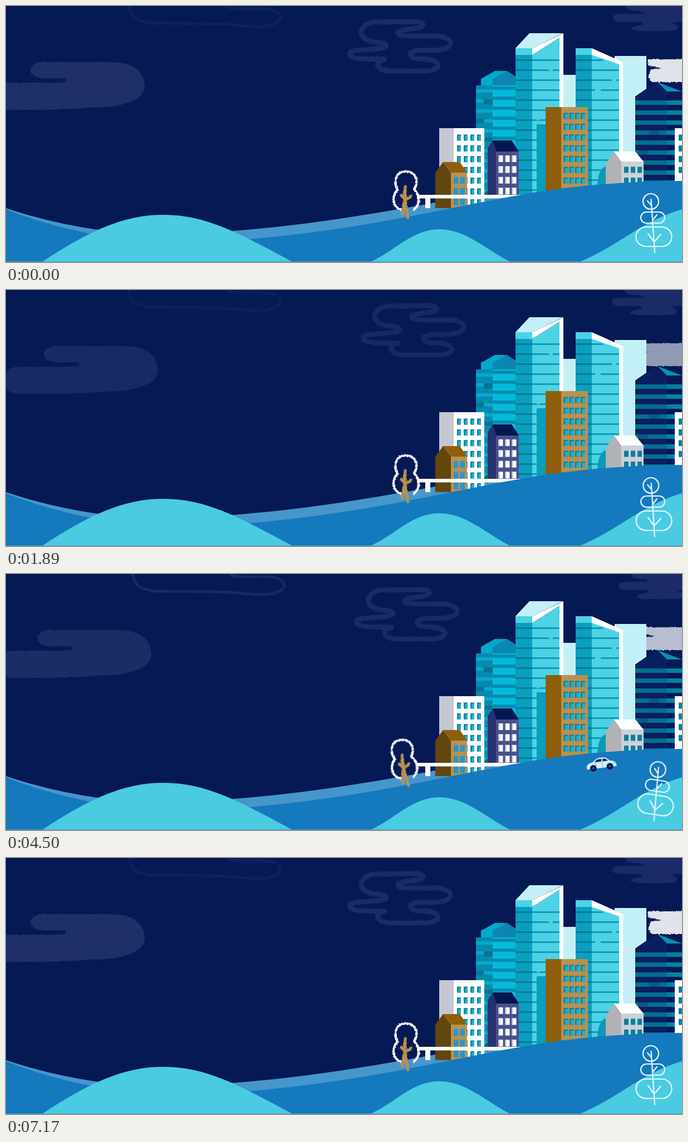
Write an HTML page without scripts that moves like this. It is 1214x461 px and loops after 7.2 s.

```html
<!DOCTYPE html>
<html lang="en">
<head>
<meta charset="utf-8">
<title>City hills</title>
<style>
html, body { margin: 0; width: 100%; height: 100%; overflow: hidden; background: #051955; }
svg { display: block; width: 100vw; height: 100vh; }
.line { fill: none; stroke-linecap: round; stroke-linejoin: round; }
.rough { filter: url(#rough); }

/* window rows: a dark pane with a lighter inset */
.dark { fill: none; stroke-width: 11; stroke: #0b7f9c; }
.glass { fill: none; stroke-width: 9; stroke: #1eb0ce; }

.drift, .sway { animation: 1.8s ease-in-out infinite alternate; }
.drift { animation-name: drift; }
.sway { animation-name: sway; animation-delay: -.9s; }
.lean { animation: lean .9s ease-in-out infinite alternate; }
.car { animation: drive 7.2s linear infinite; }

@keyframes drift {
  from { transform: none; opacity: var(--a, 1); }
  to { transform: translateX(var(--dx)); opacity: var(--b, .75); }
}
@keyframes sway {
  from { transform: translateX(calc(-1 * var(--dx))); opacity: var(--a); }
  to { transform: translateX(var(--dx)); opacity: var(--b); }
}
@keyframes lean { to { transform: rotate(var(--r)); } }
@keyframes drive {
  0% { transform: translate(-84px, 377px) rotate(16deg); }
  4.58% { transform: translate(-44px, 390px) rotate(15deg); }
  9.17% { transform: translate(2px, 402px) rotate(13deg); }
  18.33% { transform: translate(117px, 424px) rotate(9deg); }
  37.92% { transform: translate(457px, 438.5px) rotate(2deg); }
  45% { transform: translate(611px, 425px) rotate(-6deg); }
  52.08% { transform: translate(784px, 391px) rotate(-11deg); }
  59.72% { transform: translate(987px, 354px) rotate(-9deg); }
  68.75%, 100% { transform: translate(1254px, 335px) rotate(-3deg); }
}
</style>
</head>
<body>
<svg viewBox="0 0 1214 461" preserveAspectRatio="none">
  <defs>
    <filter id="rough" x="-10%" y="-10%" width="120%" height="120%" color-interpolation-filters="sRGB">
      <feTurbulence type="fractalNoise" baseFrequency=".4" numOctaves="2" seed="4"/>
      <feDisplacementMap in="SourceGraphic" scale="4" xChannelSelector="R" yChannelSelector="G"/>
    </filter>
    <path id="row4" d="M810,0h44"/>
    <path id="white" d="M810,237h44m-44,19.400h44m-44,19.400h44m-44,19.400h44m-44,19.400h44m-44,19.400h44m-44,19.400h44"/>
    <path id="brown" d="M1001.500,198h39m-39,19.400h39m-39,19.400h39m-39,19.400h39m-39,19.400h39m-39,19.400h39m-39,19.400h39"/>
    <path id="navy" d="M884.500,275h32m-32,19.400h32m-32,19.400h32m-32,19.400h32"/>
    <path id="gray" d="M1110,295h32m-32,19.400h32"/>
    <path id="cabin" d="M804,314h20m-20,19.400h20m-20,19.400h20"/>
  </defs>
  <rect width="1214" height="461" fill="#051955"/>

  <!-- clouds -->
  <g class="drift" style="--dx:24px">
    <path class="rough" fill="#1f3168" d="M-2,138H92C112,138 112,129 96,130H64C36,128 38,101 66,101H190C228,101 249,118 249,145C249,172 200,184 150,183C100,188 40,187 -2,187C-36,187 -36,138 -2,138Z"/>
  </g>
  <g class="drift" style="--dx:24.5px;--b:.85">
    <path class="line rough" stroke="#1a2d66" stroke-width="9" d="M660,29L738,28C756,30 750,40 730,41C700,43 695,52 718,54H775C808,58 805,78 770,80H740C718,83 722,94 745,95C782,95 785,113 758,117H690C664,116 660,100 680,96L640,95C609,94 609,80 640,79L668,77C692,74 684,66 664,65C632,62 628,36 660,29Z"/>
  </g>
  <g class="sway" style="--dx:6.5px;--a:.05;--b:1">
    <path class="line rough" stroke="#182b64" stroke-width="5" d="M221,-4C222,24 240,31 275,31L370,32C420,33 430,37 455,37C502,37 505,6 465,5H420C400,5 398,2 393,-4"/>
  </g>
  <g class="sway" style="--dx:10px;--a:.9;--b:1">
    <path class="rough" fill="#1d2d67" d="M1115,-5C1110,6 1116,9 1138,9L1148,14H1105C1084,15 1084,28 1105,29H1140C1150,32 1140,34 1130,36C1118,40 1122,45 1140,45H1195C1210,45 1210,33 1195,31C1200,27 1240,30 1240,20V-5Z"/>
  </g>
  <g class="drift" style="--dx:-24px;--a:.88;--b:.56">
    <path class="rough" fill="#fff" d="M1152,96H1290V137H1160L1153,128L1158,114L1178,112L1154,107Z"/>
  </g>

  <path fill="#4696cc" d="M0,364C50,381 110,395 165,403C260,412 340,410 407,405C520,397 640,378 760,356C810,346 850,338 900,332V461H0Z"/>

  <!-- towers -->
  <path fill="#c3f0f6" d="M1000,124h24v200h-24ZM1093,90h57v59l-20,14v160h-37Z"/>

  <path fill="#00a9c9" d="M853,143V131L878,117H900L874,143Z"/>
  <path fill="#0b86b0" d="M874,143V131L900,117L921,131V143Z"/>
  <path fill="#068bae" d="M844,143h30v200h-30Z"/>
  <path fill="#04bbdc" d="M874,143h56v200h-56Z"/>
  <g stroke-dasharray="6 12">
    <path stroke="#04a9cb" stroke-width="30" d="M859,150V340"/>
    <path stroke="#078cae" stroke-width="56" d="M902,145V340"/>
  </g>
  <path fill="#067496" d="M858,168h16v9h-16ZM844,203h14v8h-14ZM858,237h16v8h-16Z"/>

  <path fill="#0b9fbf" d="M915,88h30v258h-30Z"/>
  <path fill="#4dd2e5" d="M915,76H945V88L994,57V346H945V88H915Z"/>
  <path fill="#c3f0f6" d="M915,76L940,49H1000L945,76Z"/>
  <g stroke-dasharray="3 15">
    <path stroke="#077b9c" stroke-width="30" d="M930,96V340"/>
    <path stroke="#0b9cba" stroke-width="49" d="M969.5,96V340"/>
  </g>
  <path fill="#fff" d="M945,76L1001,49V346H994V57L945,88Z"/>
  <path fill="#0a9ebd" d="M953,213h16v130h-16Z"/>
  <path stroke="#4dd2e5" stroke-width="3" d="M975,115.500h7M953,204h6"/>

  <path fill="#0b9fbf" d="M1023,88h29v248h-29Z"/>
  <path fill="#4dd2e5" d="M1023,76H1052V80L1101,102V336H1052V88H1023Z"/>
  <g stroke-dasharray="3 15">
    <path stroke="#077b9c" stroke-width="29" d="M1037.500,96V330"/>
    <path stroke="#0b9cba" stroke-width="49" d="M1076.500,114V330"/>
    <path stroke="#0b9cba" stroke-width="20" d="M1062,96v4"/>
  </g>
  <path fill="#fff" d="M1052,76L1108,101V336H1101V105L1052,88Z"/>
  <path stroke="#4dd2e5" stroke-width="3" d="M1058,151.500h10M1088,133.500h8"/>

  <path fill="#0a1f60" d="M1130,163L1170,137L1187,154V325H1130Z"/>
  <path fill="#05185a" d="M1187,154h27v170h-27Z"/>
  <path fill="#0690b0" d="M1170,137L1214,154H1187Z"/>
  <g stroke-dasharray="8 10">
    <path stroke="#046f8e" stroke-width="57" d="M1158.500,170V318"/>
    <path stroke="#0582a2" stroke-width="27" d="M1200.500,170V318"/>
  </g>
  <path fill="#075a80" d="M1155,224h18v8h-18ZM1136,260h18v8h-18Z"/>

  <!-- blocks and houses -->
  <path fill="#fff" d="M1201,220h13v105h-13Z"/>
  <path class="dark" d="M1208,237h6m-6,19.400h6m-6,19.400h6m-6,19.400h6"/>

  <path fill="#c4c6d2" d="M778,220h26v140h-26Z"/>
  <path fill="#fff" d="M804,220h55v140h-55Z"/>
  <g stroke-dasharray="7 5">
    <use href="#white" class="dark"/>
    <use href="#white" class="glass" y="1" stroke-dasharray="4.500 7.500" stroke-dashoffset="-2.500"/>
  </g>

  <path fill="#0c6a5a" d="M857,346C858,330 872,328 876,346Z"/>
  <path fill="#28316f" d="M865,256L874,242L880,262V345H865Z"/>
  <path fill="#051750" d="M874,242H908L921,262H880Z"/>
  <path fill="#47508c" d="M880,262h41v82h-41Z"/>
  <g fill="none" stroke-width="12">
    <use href="#navy" stroke="#fff" stroke-dasharray="8 4"/>
    <use href="#navy" stroke="#c4c6d2" stroke-dasharray="2 10"/>
  </g>

  <path fill="#8d5f0b" d="M969,182h28v160h-28Z"/>
  <path fill="#b8914f" d="M997,182h48v160h-48Z"/>
  <g stroke-dasharray="8 2.200">
    <use href="#brown" class="dark"/>
    <use href="#brown" class="glass" y="1" stroke-dasharray="5.500 4.700" stroke-dashoffset="-2.500"/>
  </g>

  <path fill="#0b99b5" d="M1062,325C1062,305 1068,291 1078,288V325Z"/>
  <path fill="#b1b2b6" d="M1077,285L1092,262L1105,280V330H1077Z"/>
  <path fill="#fff" d="M1092,262H1130L1145,280H1105Z"/>
  <path fill="#cbd0d9" d="M1105,280h40v45h-40Z"/>
  <use href="#gray" class="dark" stroke-dasharray="8 4"/>

  <path fill="#63460e" d="M771,300L785,281L799,300V364H771Z"/>
  <path fill="#8d5f0b" d="M785,281H815L828,300H799Z"/>
  <path fill="#b8914f" d="M799,300h29v64h-29Z"/>
  <use href="#cabin" fill="none" stroke="#2b95cc" stroke-width="12" stroke-dasharray="8.500 3"/>
  <path fill="#fff" d="M738,340H930V346.500H738ZM753,346h9v18h-9Z"/>

  <!-- hills and road -->
  <path fill="#1579bd" d="M0,366C50,386 110,403 160,411C210,418 270,424 330,424C430,424 560,411 740,376C860,352 960,330 1060,322S1170,316 1214,315V461H0Z"/>

  <g class="car">
    <path fill="#d2f3f9" d="M-26,1C-28,-7 -22,-10 -15,-11L-8,-16C-4,-18 7,-18 11,-15.500L16,-10.500C26,-8.500 28,-5 27,1Z"/>
    <path fill="#0b1f5c" d="M-12,-10.500L-6,-15H1V-10.500ZM3,-15H8L13,-10.500H3Z"/>
    <path class="line" stroke="#5fa9c4" d="M2,-10V0M-10,-9V-2M22,-5h3"/>
    <g fill="#0b1a4e"><circle cx="-15" r="6"/><circle cx="15" r="6"/></g>
    <g fill="#3d5a8c"><circle cx="-15" r="2"/><circle cx="15" r="2"/></g>
  </g>

  <path fill="#4acbe2" d="M66,460C150,405 210,376 283,376C360,376 420,410 513,460ZM656,460C700,440 730,402 778,402C825,402 860,437 904,460ZM1032,460C1100,432 1140,388 1214,366V460Z"/>
  <path fill="#4696cc" d="M0,460h1214v1H0Z"/>

  <!-- trees -->
  <g class="lean" style="--r:-7.2deg;transform-origin:720px 371px">
    <g class="line rough">
      <path stroke="#f4f6fb" stroke-width="4.200" d="M711,367C692,362 693,342 703,331C696,318 699,298 718,298C738,298 741,318 733,330C745,342 743,360 732,367"/>
      <path stroke="#b8914f" stroke-width="5.500" d="M717,326L716,345L721.500,381M716,347L712,374M710,341L717,349L727,343"/>
    </g>
  </g>
  <g class="lean" style="--r:8.8deg;transform-origin:1163.500px 435px">
    <g class="line" stroke="#e8f7fc" stroke-width="2.200">
      <circle cx="1158" cy="352" r="14"/>
      <rect x="1140" y="371" width="43" height="20" rx="10"/>
      <rect x="1131.500" y="398" width="64" height="35" rx="17.500"/>
      <path d="M1158.500,348L1165,444M1152,351L1159,359M1169,376L1161,386M1153,410L1164,425L1176,411"/>
    </g>
  </g>
</svg>
</body>
</html>
```
